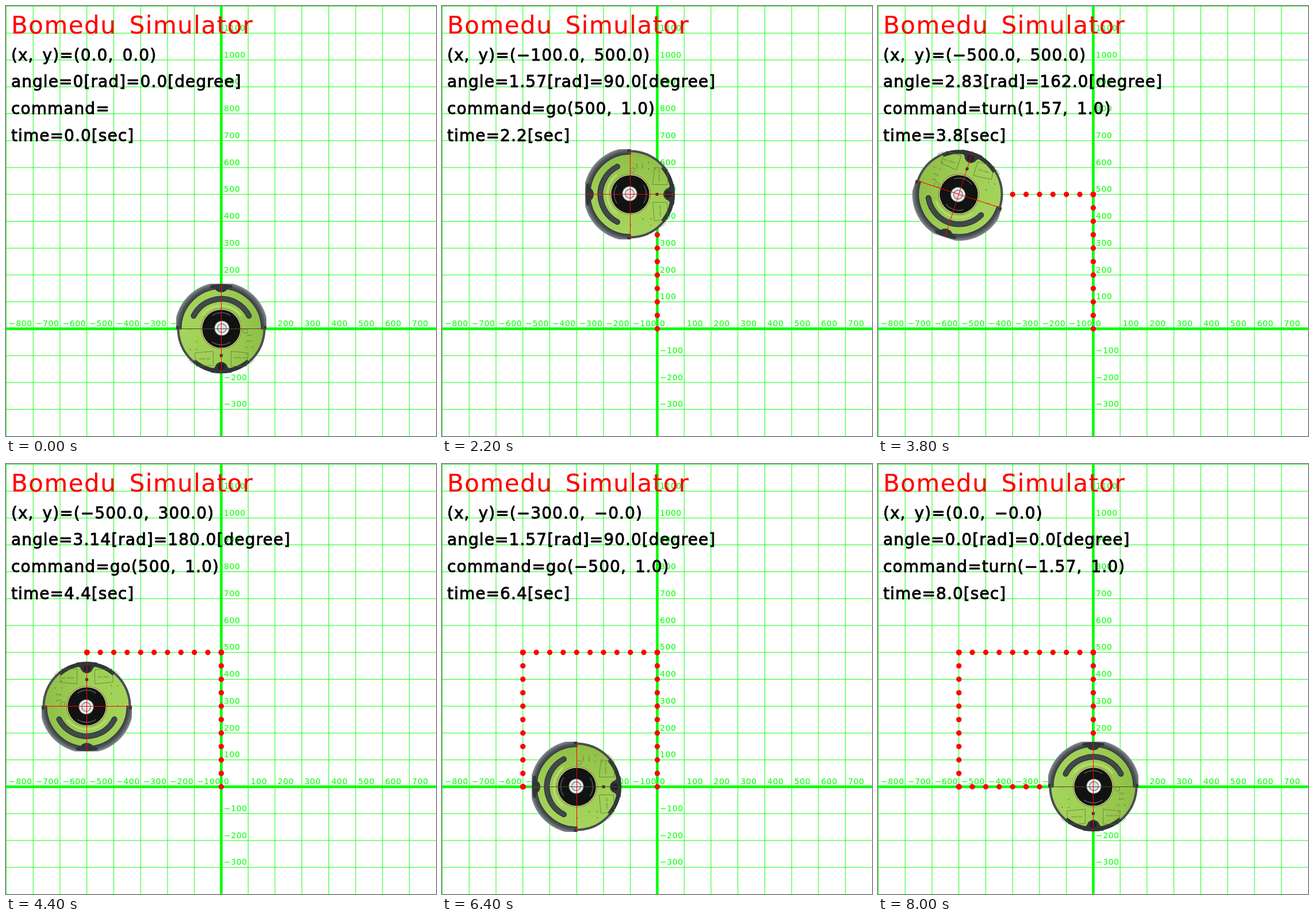
An HTML page with a canvas that plays this animation: 748x748 px, repeating every 8100 ms.

```html
<!DOCTYPE html>
<html lang="en">
<head>
<meta charset="utf-8">
<title>Robot simulator</title>
<style>
  html, body { margin: 0; height: 100%; overflow: hidden; background: #fff; }
  canvas { display: block; }
</style>
</head>
<body>
<canvas id="stage" width="748" height="748"></canvas>
<script>
const SIZE = 748, CELL = 46.75, SCALE = CELL / 100, UNIT = CELL / 50;
const STEP = 100, STEPS = 81, RAD = Math.PI / 180;
const GREEN = '#00ff00', RED = '#ff0000', DARK = '#303638';
const ctx = document.getElementById('stage').getContext('2d');

const legs = [
  ['go', 500], ['turn', 1.57], ['go', 500], ['turn', 1.57],
  ['go', 500], ['turn', -1.57], ['go', -500], ['turn', -1.57]
];

// Each leg lasts one second: ten steps of 50 units or 9 degrees.
function simulate() {
  const states = [{ x: 0, y: 0, deg: 0, command: '' }];
  let x = 0, y = 0, deg = 0;
  for (const [verb, amount] of legs) {
    for (let i = 0; i < 10; i++) {
      if (verb === 'turn') {
        deg += Math.sign(amount) * 9;
      } else {
        x = Math.round(x - Math.sin(deg * RAD) * amount / 10);
        y = Math.round(y + Math.cos(deg * RAD) * amount / 10);
        if (deg >= 90 && y === 0) y = -1e-9; // reads as -0.0
      }
      states.push({ x, y, deg, command: `${verb}(${amount}, 1.0)` });
    }
  }
  return states;
}
const states = simulate();

const px = x => SIZE / 2 + x * SCALE;
const py = y => 12 * CELL - y * SCALE;

function text(str, x, y, size, color, weight = 0) {
  ctx.font = `${size}px "DejaVu Sans", sans-serif`;
  ctx.letterSpacing = size * 0.038 + 'px';
  ctx.wordSpacing = size * 0.18 + 'px';
  ctx.fillStyle = ctx.strokeStyle = color;
  str = str.replace(/-/g, '\u2212');
  ctx.fillText(str, x, y);
  if (weight) {
    ctx.lineWidth = weight;
    ctx.lineJoin = 'round';
    ctx.strokeText(str, x, y);
  }
}

function disc(x, y, r, fill) {
  ctx.fillStyle = fill;
  ctx.beginPath();
  ctx.arc(x, y, r, 0, 7);
  ctx.fill();
}

function arc(x, y, r, from, to, width, color) {
  ctx.strokeStyle = color;
  ctx.lineWidth = width;
  ctx.beginPath();
  ctx.arc(x, y, r, from * RAD, to * RAD);
  ctx.stroke();
}

function shape(path, fill, stroke) {
  const p = new Path2D(path);
  if (fill) { ctx.fillStyle = fill; ctx.fill(p); }
  if (stroke) { ctx.strokeStyle = stroke; ctx.lineWidth = 0.7; ctx.stroke(p); }
}

function gridLine(p, width) {
  const w = width * UNIT, start = p + (UNIT - w) / 2;
  ctx.fillRect(start, 0, w, SIZE);
  ctx.fillRect(0, start, SIZE, w);
}

function drawGrid() {
  ctx.fillStyle = GREEN;
  for (let i = 0; i <= 16; i++) gridLine(i * CELL, 1);
  const axis = 5 * UNIT;
  ctx.fillRect(px(0) - 2 * UNIT, 0, axis, SIZE);
  ctx.fillRect(0, py(0) - 2 * UNIT, SIZE, axis);
  for (let v = -800; v < 800; v += 100) text(`${v}`, px(v) + 5, py(0) - 4, 14, GREEN);
  for (let v = -300; v < 1200; v += 100) {
    if (v) text(`${v}`, px(0) + 5, py(v) - 4, 14, GREEN);
  }
}

function paint(gradient, ...colors) {
  colors.forEach((c, i) => gradient.addColorStop(i / (colors.length - 1), c));
  return gradient;
}

function drawBody() {
  ctx.beginPath();
  ctx.rect(-78.5, -78.5, 157, 157);
  ctx.clip();

  disc(0, 0, 77, '#484e50');
  disc(0, 0, 73, paint(ctx.createLinearGradient(-73, 0, 73, 0), '#a5d45c', '#9fce55', '#8fbf47'));

  // bumpers
  const rim = paint(ctx.createRadialGradient(0, 0, 69, 0, 0, 81), '#35393c', '#53585c', '#888e94');
  arc(0, 0, 75, 179, 361, 12, rim);
  arc(0, 0, 73.5, 50, 130, 7, DARK);
  shape('M-79-5h5v6h-5zM79-5h-5v6h5z', DARK);
  shape('M-20-72Q-11-71-8-66Q0-61 8-66Q11-71 20-72L18-76Q0-79-18-76Z', DARK);
  shape('M-20 72Q-11 69-9 62Q0 53 9 62Q11 69 20 72L18 76Q0 79-18 76Z', DARK);
  disc(0, 66, 6, '#202426');

  // handle
  ctx.lineCap = 'round';
  arc(0, 2, 54, 207, 333, 10, '#30393a');
  arc(0, 2, 54, 207, 333, 7, '#414949');
  ctx.lineCap = 'butt';
  arc(0, 3, 43, 218, 322, 3, '#b5dc72');

  // panels and small print
  const ink = '#56712d';
  shape('M-46 42L-14 39V64L-44 65ZM17 39L47 42L44 65L17 65Z', null, ink);
  shape('M-57 54L-49 62M57 54L49 62', null, ink);
  text('clean bin', -39, 53, 4, ink);
  text('empty bin', 22, 51, 4, ink);
  ctx.fillStyle = DARK;
  ctx.fillRect(-2.5, 44, 5, 5);
  arc(42, 4, 4, 0, 360, 0.7, ink);
  text('spot', 44, 12, 4, ink);
  text('dock', 44, 22, 4, ink);
  for (const [x, y] of [[-54, 1], [-43, 22], [-54, 36], [-43, 36], [44, 32], [55, 32], [30, 1], [44, 44]]) {
    disc(x, y, 0.9, ink);
  }

  // hub
  disc(0, 0, 35.5, '#5b6d2c');
  disc(0, 0, 34.7, '#e5dc91');
  disc(0, 0, 33.3, '#111313');
  arc(0, 0, 28, 235, 305, 1.5, '#53585a');
  arc(0, 0, 28, 55, 125, 1.5, '#53585a');
  disc(1, -1, 13, '#8c9090');
  disc(1, -1, 12, '#ededeb');
  disc(1, -1, 8.5, '#7f8585');
  disc(1, -1, 7, '#dde0e0');
}

function drawRobot({ x, y, deg }) {
  ctx.save();
  ctx.translate(Math.round(px(x)) + 0.5, Math.round(py(y)) + 0.5);
  ctx.save();
  ctx.rotate(-deg * RAD);
  drawBody();
  ctx.restore();
  for (const a of [deg + 90, deg]) {
    const onAxis = Math.abs(y) < 1 && a % 180 === 90;
    ctx.save();
    ctx.rotate(-a * RAD);
    ctx.fillStyle = onAxis ? '#4c4a20' : RED;
    ctx.fillRect(-0.5, -78.5, 1, 157);
    ctx.restore();
  }
  ctx.restore();
}

// At most two decimals, at least one.
function radians(deg) {
  const s = (deg * RAD).toFixed(2);
  return s.endsWith('0') ? s.slice(0, -1) : s;
}

function drawInfo(n, { x, y, deg, command }) {
  const rad = n <= 10 ? '0' : radians(deg);
  text('Bomedu Simulator', 9, 48, 41.8, RED, 0.2);
  [
    `(x, y)=(${x.toFixed(1)}, ${y.toFixed(1)})`,
    `angle=${rad}[rad]=${deg.toFixed(1)}[degree]`,
    `command=${command}`,
    `time=${(n / 10).toFixed(1)}[sec]`
  ].forEach((line, i) => text(line, 9, 94.5 + i * CELL, 28, '#000', 0.9));
}

function draw(n) {
  ctx.fillStyle = '#fff';
  ctx.fillRect(0, 0, SIZE, SIZE);
  drawGrid();
  for (const s of states.slice(0, n + 1)) {
    disc(px(s.x) + UNIT / 2, py(s.y) + UNIT / 2, 5 * UNIT, RED);
  }
  drawRobot(states[n]);
  drawInfo(n, states[n]);
}

function tick() {
  draw(Math.floor(performance.now() / STEP) % STEPS);
  requestAnimationFrame(tick);
}
tick();
</script>
</body>
</html>
```
